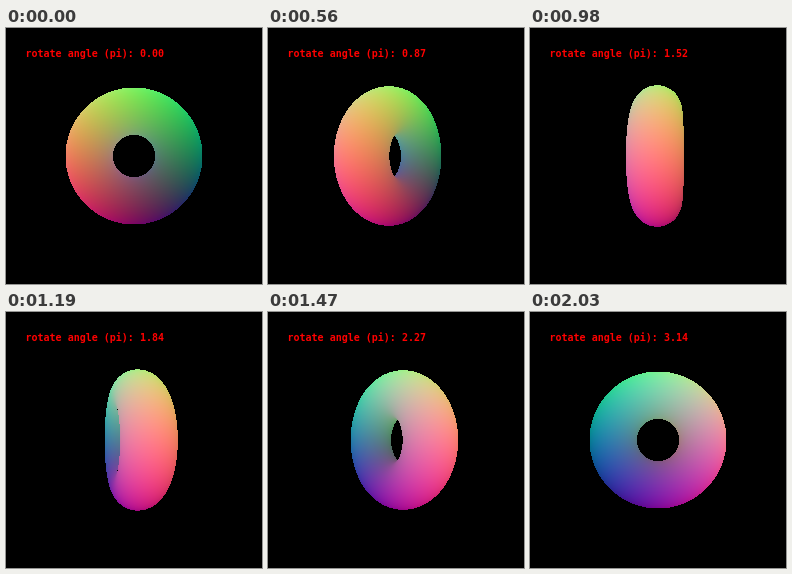
Write an HTML page with a canvas that moves like this. It is 256 by 256 pixels and loops after 2100 ms.

```html
<!DOCTYPE html>
<html>
<head>
<meta charset="utf-8">
<style>
html, body { margin: 0; width: 100%; height: 100%; overflow: hidden; background: #000; }
canvas { display: block; width: 100vw; height: 100vh; image-rendering: pixelated; }
</style>
</head>
<body>
<canvas id="stage" width="256" height="256"></canvas>
<script>
const SIZE = 256, STEPS = 30, STEP_MS = 70;
const RING = 0.6, TUBE = 0.312, EXTENT = RING + TUBE;
const DISTANCE = 3, FOCAL = SIZE / 2 / Math.tan(Math.PI / 6);
const ctx = document.getElementById('stage').getContext('2d');
const image = ctx.createImageData(SIZE, SIZE);

// Surface colour is the position within the torus bounds.
const tone = (p, light) => (p / EXTENT + 1) * 127.5 * light;

// March one ray; returns the pixel colour or null when it misses.
function trace(ox, oz, dx, dy, dz) {
  let t = DISTANCE - 1.05;
  for (let i = 0; i < 120 && t < DISTANCE + 1.2; i++) {
    const x = ox + dx * t, y = dy * t, z = oz + dz * t;
    const rho = Math.hypot(x, y), radial = rho - RING;
    const gap = Math.hypot(radial, z) - TUBE;
    if (gap < 0.0003) {
      const k = radial / rho;
      const facing = Math.max(0, -(k * (x * dx + y * dy) + z * dz) / TUBE);
      const light = 0.96 + 0.04 * facing;
      return [tone(x, light), tone(y, light), tone(z, light)];
    }
    t += gap;
  }
  return null;
}

function drawTorus(angle) {
  const s = Math.sin(angle), c = Math.cos(angle);
  image.data.fill(0);
  for (let py = 54; py < 202; py++) {
    for (let px = 54; px < 202; px++) {
      const u = (px + 0.5 - SIZE / 2) / FOCAL;
      const v = (SIZE / 2 - py - 0.5) / FOCAL;
      const n = Math.hypot(u, v, 1);
      const rgb = trace(DISTANCE * s, -DISTANCE * c,
        (-s - c * u) / n, v / n, (c - s * u) / n);
      if (rgb) image.data.set(rgb, (py * SIZE + px) * 4);
    }
  }
  for (let i = 3; i < image.data.length; i += 4) image.data[i] = 255;
  ctx.putImageData(image, 0, 0);
}

function drawLabel(angle) {
  ctx.fillStyle = '#f00';
  ctx.font = 'bold 10px "DejaVu Sans Mono", monospace';
  ctx.fillText('rotate angle (pi): ' + angle.toFixed(2), 19.5, 29);
}

const start = performance.now();
let shown = -1;

function update(now) {
  const step = Math.floor(Math.max(0, now - start) / STEP_MS) % STEPS;
  if (step !== shown) {
    shown = step;
    const angle = Math.PI * step / (STEPS - 1);
    drawTorus(angle);
    drawLabel(angle);
  }
  requestAnimationFrame(update);
}
update(start);
</script>
</body>
</html>
```
